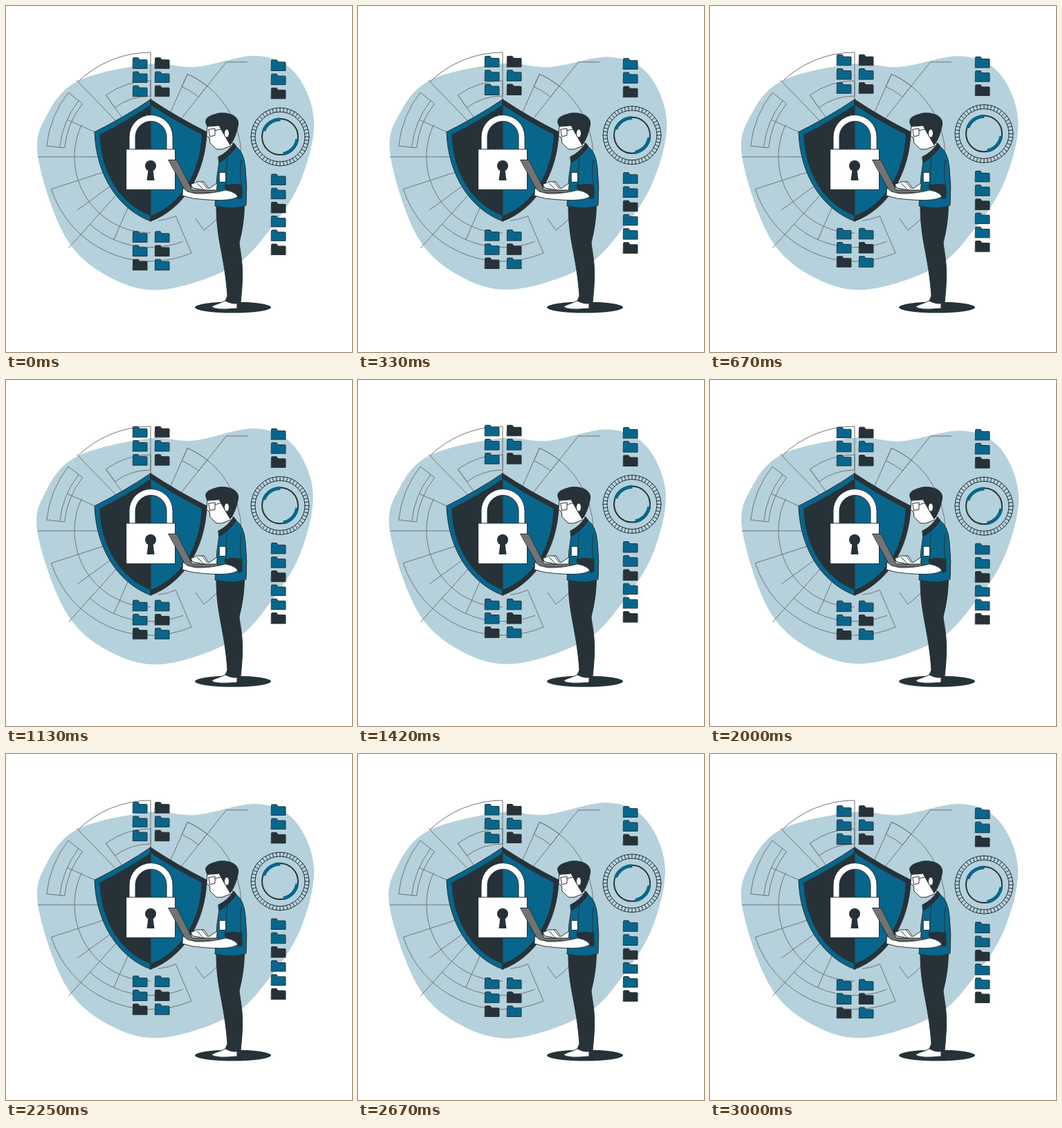
Recreate the animation shown at these times as an HTML page. Size 500x500 px, loop 3040 ms.

```html
<!DOCTYPE html>
<html lang="en">
<head>
<meta charset="utf-8">
<title>Data protection</title>
<style>
html, body { margin: 0; width: 100%; height: 100%; overflow: hidden; background: #fff; }
svg { display: block; width: 100%; height: 100%; }
.blue { fill: #08668c; }
.dark { fill: #263238; }
.white { fill: #fff; }
.gray { fill: #737373; }
.line { fill: none; }
.edge, .line { stroke: #263238; stroke-linejoin: round; stroke-linecap: round; }
</style>
</head>
<body>
<svg viewBox="0 0 500 500">
  <defs>
    <path id="half" d="M0-88Q-39-62-81-41C-79 22-46 71 0 88Z"/>
    <path id="folder" d="M0 1q0-1 1-1h6.500l2 3h10q1 0 1 1v11.500h-20.500z"/>
  </defs>
  <path id="blob" fill="#b5d1dc"/>
  <path id="web" fill="none" stroke="#737373"/>

  <g transform="translate(209 223)">
    <use href="#half" class="blue edge"/>
    <use href="#half" class="dark edge" transform="scale(-1 1)"/>
    <use href="#half" class="dark" transform="scale(.91)"/>
    <use href="#half" class="blue" transform="scale(-.91 .91)"/>
    <path class="line" d="M0-88V88"/>
    <path class="white edge" d="M-31-15v-19a31.500 31.500 0 0 1 63 0v19h-9v-19a22.500 22.500 0 0 0-45 0v19z"/>
    <rect class="white edge" x="-35" y="-16" width="70.500" height="58.500"/>
    <circle class="dark" cy="8" r="8"/>
    <path class="dark" d="M-3 10h6l2.500 19h-11z"/>
  </g>

  <g id="float"></g>

  <g id="man">
    <ellipse class="dark" cx="328" cy="435.500" rx="55" ry="8"/>
    <path class="white edge" d="M318 425C314 429 300 431 297 435Q304 440 334 437V428Z"/>
    <path class="dark edge" d="M304 289H344.500Q344 315 337 342C339 362 345 375 339 428Q330 433 317 426L320 419C316 360 304 340 304 289Z"/>
    <path class="white edge" d="M291 173L290 188L294 190L295 198L304 207H312L328 201L319 172Z"/>
    <path class="dark edge" d="M291 174C286 164 288 160 307 155C324 153 339 160 335 174Q332 190 324 201L313 182L308 173Z"/>
    <ellipse class="white edge" cx="319" cy="184" rx="3.500" ry="6"/>
    <path class="line" d="M293 178.500l9-1.500v10l-7 1.500zM302 180l12-3"/>
    <path class="blue edge" d="M309 219L331 202Q344 210 346 234Q349 262 347 288Q330 295 302 289L305 246Z"/>
    <path class="dark edge" d="M307 218Q321 211 329 198L333 203Q322 219 308 226Z"/>
    <path class="line" d="M320 220Q317 240 318 259M340 222Q337 240 340 259"/>
    <rect class="white edge" x="308.500" y="240.500" width="9" height="14"/>
    <path class="white edge" d="M305 256L293 264L286 254H276L267 258L270 263L304 269Z"/>
    <path class="line" d="M276 256l8 8M283 254l8 10"/>
    <path class="gray edge" d="M235 222.500H247L269 266H308V270H261Z"/>
    <path class="white edge" d="M256 263L262 268L274 271Q296 272 321 265L339 270Q336 286 270 278L255 274Z"/>
    <path class="dark edge" d="M316 259Q330 256 341 259V277L335 278Q336 270 318 266Z"/>
  </g>
</svg>
<script>
const $ = id => document.getElementById(id);

// Closed smooth curve through key points
const smooth = pts => {
  const at = i => pts[(i + pts.length) % pts.length];
  const mix = (p, a, b) => p.map((v, k) => v + (b[k] - a[k]) / 6);
  return 'M' + at(0) + pts.map((p, i) => {
    const q = at(i + 1);
    return `C${mix(p, at(i - 1), q)} ${mix(q, at(i + 2), p)} ${q}`;
  }).join('') + 'Z';
};
$('blob').setAttribute('d', smooth([
  [46, 217], [60, 156], [105, 108], [206, 84], [274, 88], [362, 72], [417, 96],
  [445, 165], [426, 252], [382, 322], [327, 377], [225, 410], [148, 391], [86, 334]
]));

// Polar drawing around a centre, angles in degrees
const around = (cx, cy) => {
  const at = (r, deg) => {
    const a = deg * Math.PI / 180;
    return `${cx + r * Math.cos(a)} ${cy + r * Math.sin(a)}`;
  };
  const arc = (r, a, b) => `M${at(r, a)}A${r} ${r} 0 0 1 ${at(r, b)}`;
  const ray = (a, r1, r2) => `M${at(r1, a)}L${at(r2, a)}`;
  const cell = (r1, r2, a, b) => arc(r1, a, b) + arc(r2, a, b) + ray(a, r1, r2) + ray(b, r1, r2);
  return { arc, ray, cell };
};

const { arc, ray, cell } = around(209, 218);
const spokes = { 114: 131, 132: 177, 144: 131, 162: 151, 180: 163, 204: 132,
  226: 154, 234: 110, 270: 151, 294: 131, 308.6: 175 };
$('web').setAttribute('d',
  Object.entries(spokes).map(([a, r]) => ray(+a, 60, r)).join('') +
  cell(125, 151, 186, 218) + arc(132, 186, 218) +
  cell(88, 110, 234, 270) + cell(111, 131, 294, 308.6) +
  arc(151, 226, 270) + arc(131, 294, 360) + arc(131, 30, 54) + ray(54, 110, 131) +
  arc(110, 90, 205) + arc(131, 69, 132) + arc(151, 67, 162) +
  ray(67, 93, 151) + arc(93, 67, 83) + 'M318 81h31');

// A column of folders: b is blue, d is dark
const stack = (x, y, colors) => [...colors].map((c, i) =>
  `<use href="#folder" class="${c === 'b' ? 'blue' : 'dark'} edge" x="${x}" y="${y + i * 20.2}"/>`).join('');

const dial = (cx, cy) => {
  const { arc, ray } = around(cx, cy);
  const ring = (r, w) => `<circle class="line" cx="${cx}" cy="${cy}" r="${r}" stroke-width="${w}"/>`;
  const ticks = Array.from({ length: 48 }, (_, i) => ray(i * 7.5, 36, 42)).join('');
  return ring(42, 1) + ring(36, 1) + ring(26, 2) + `<path class="line" d="${ticks}"/>
    <path fill="none" stroke="#08668c" stroke-width="5" d="${arc(25, 200, 271) + arc(25, 8, 79)}"/>`;
};

$('float').innerHTML =
  stack(183.5, 74.8, 'bbb') + stack(215.5, 74.8, 'dbd') +
  stack(183.5, 325.8, 'bbd') + stack(215.5, 325.8, 'bdb') +
  stack(383.5, 78, 'bbd') + stack(383.5, 243, 'bbdbbd') + dial(396, 189);

// Triangle wave from 0 to 1 and back over one unit
const tri = u => 1 - Math.abs(1 - 2 * (u % 1));

let start;
function draw(now) {
  start ??= now;
  const t = (now - start) % 3040;
  $('float').setAttribute('transform', `translate(0 ${-10 * tri(t / 3000)})`);
  $('blob').setAttribute('transform', `rotate(${2 * tri(t / 1500 + .25) - 1} 250 250)`);
  requestAnimationFrame(draw);
}
requestAnimationFrame(draw);
</script>
</body>
</html>
```
